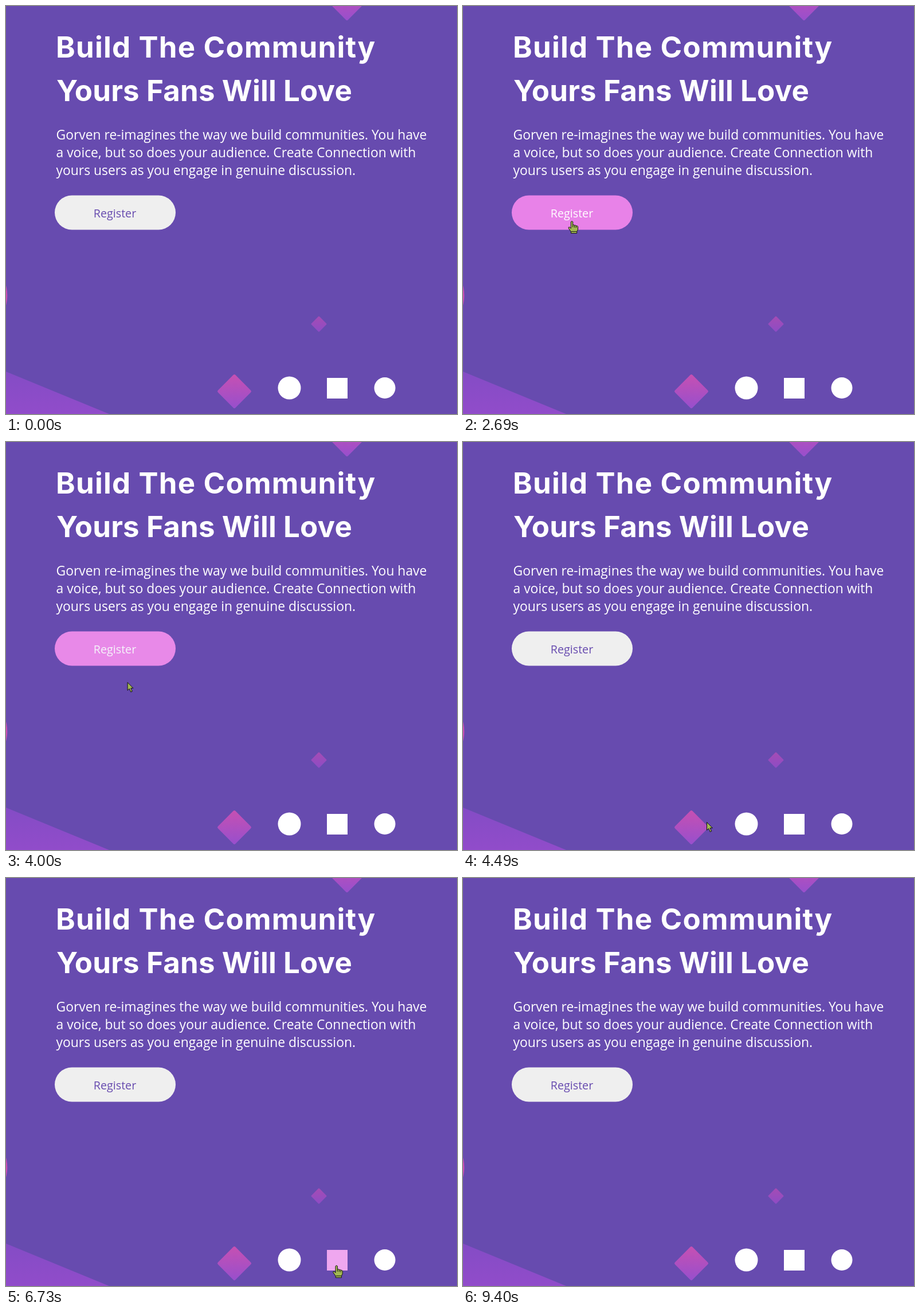
Write an HTML page that moves like this. It is 787 px wide and 712 px high and loops after 9.8 s.

```html
<!DOCTYPE html>
<html lang="en">
<head>
<meta charset="utf-8">
<title>Community landing page</title>
<style>
  html, body { margin: 0; width: 100%; height: 100%; overflow: hidden; background: #674baf; }
  svg { display: block; width: 787px; height: 712px; }
  .title { font: 700 51px Inter, sans-serif; fill: #fff; }
  .copy { font: 400 22.86px "Open Sans", sans-serif; fill: #fff; }
  .label { font: 400 19.7px "Open Sans", sans-serif; }
</style>
</head>
<body>
<svg viewBox="0 0 787 712">
  <defs>
    <linearGradient id="warm" x1="0" y1="0" x2="1" y2="1">
      <stop offset="0" stop-color="#c750b2"/>
      <stop offset="1" stop-color="#974fcd"/>
    </linearGradient>
    <linearGradient id="cool" x1="0" y1="0" x2="1" y2="1">
      <stop offset="0" stop-color="#a54cb4"/>
      <stop offset="1" stop-color="#8d4cc5"/>
    </linearGradient>
    <linearGradient id="hill" x1="0" y1="0" x2="0" y2="1">
      <stop offset="0" stop-color="#844cc5"/>
      <stop offset="1" stop-color="#914cca"/>
    </linearGradient>
    <rect id="tile" x="-21.5" y="-21.5" width="43" height="43" rx="2.5" transform="rotate(45)"/>
  </defs>
  <rect width="787" height="712" fill="#674baf"/>
  <use href="#tile" transform="translate(595 -4.5)" fill="url(#warm)"/>
  <use href="#tile" transform="translate(398.5 672.5)" fill="url(#warm)"/>
  <use href="#tile" transform="translate(546 555) scale(.46)" fill="url(#cool)"/>
  <circle cx="-63.7" cy="505" r="66" fill="#c94fb4"/>
  <path d="M0 638L180 712H0Z" fill="url(#hill)"/>

  <g class="title">
    <text x="87" y="90" letter-spacing="1.2">Build The Community</text>
    <text x="88" y="166" letter-spacing=".15">Yours Fans Will Love</text>
  </g>
  <g class="copy">
    <text x="87.5" y="233">Gorven re-imagines the way we build communities. You have</text>
    <text x="87.5" y="264">a voice, but so does your audience. Create Connection with</text>
    <text x="87.5" y="295">yours users as you engage in genuine discussion.</text>
  </g>

  <rect id="button" x="85" y="330.5" width="211" height="60" rx="30"/>
  <text id="label" class="label" x="190" y="369" text-anchor="middle">Register</text>

  <circle id="first" cx="494.5" cy="666.5" r="20"/>
  <rect id="second" x="560" y="649" width="36" height="36"/>
  <circle id="third" cx="661" cy="666.5" r="18.5"/>

  <g id="cursor" fill="#a3b853" stroke="#111" stroke-linejoin="round">
    <circle id="press" r="14" fill="#ff0" fill-opacity=".47" stroke="none"/>
    <path id="arrow" d="M.5.5V14.5L3.7 11.5 6.2 17.3 8.7 16.2 6.2 10.6H10.4Z"/>
    <g id="hand">
      <path d="M-1.7 1.5Q0-.8 1.7 1.5V7Q3.4 6 4.6 7.6 6.3 6.8 7.4 8.5 9.8 7.8 10.5 10V15L8.7 18.5V21.5H-1.5V19L-5.8 12.7Q-6.4 10.3-4.2 10.6L-1.7 13Z"/>
      <path d="M1.7 7V11M4.6 8V11.5M7.4 8.7V12M-1 18.5H8.5" fill="none"/>
    </g>
  </g>
</svg>
<script>
const LOOP = 9800, FADE = 400, CLICK = 150;
const ENTRY = [770, 700];
const WHITE = [255, 255, 255], PALE = [239, 239, 239], PINK = [232, 130, 232], VIOLET = [103, 75, 175];
const el = id => document.getElementById(id);

// pointer trips; "leave" trips speed up, the others slow down
const trips = [
  { from: 1120, to: 2070, x: 190, y: 375 },
  { from: 2690, to: 3170, x: 193, y: 405 },
  { from: 3170, to: 3500, x: 195, y: 375 },
  { from: 3700, to: 4470, x: 425, y: 663, leave: true },
  { from: 4900, to: 5500, x: 484, y: 667 },
  { from: 6250, to: 6800, x: 577, y: 676 },
  { from: 7540, to: 8000, x: 642, y: 667 },
  { from: 8360, to: 9330, x: 720, y: 711, leave: true }
];
const clicks = [5950, 7200, 8430];

// alternating enter and leave times
const hover = {
  button: [1890, 2980, 3290, 3980],
  first: [5000, 6300],
  second: [6560, 7610],
  third: [7880, 8950]
};

const ease = p => 1 - (1 - Math.min(p, 1) ** 1.3) ** 3;
const inside = (times, t) => times.filter(s => s <= t).length % 2 === 1;
const mix = (a, b, k) => `rgb(${a.map((v, i) => Math.round(v + (b[i] - v) * k))})`;
const show = (id, on) => el(id).setAttribute("visibility", on ? "visible" : "hidden");
const fill = (id, color) => el(id).setAttribute("fill", color);

function level(times, t) {
  let v = 0;
  times.forEach((start, i) => {
    const end = Math.min(t, times[i + 1] ?? LOOP);
    if (end > start) v += ((i + 1) % 2 - v) * ease((end - start) / FADE);
  });
  return v;
}

// x and y use different powers, which bends the route
function locate(t) {
  let [x, y] = ENTRY;
  for (const trip of trips) {
    if (t < trip.from) break;
    const k = Math.min((t - trip.from) / (trip.to - trip.from), 1);
    const run = power => trip.leave ? k ** power : 1 - (1 - k) ** power;
    x += (trip.x - x) * run(2.8);
    y += (trip.y - y) * run(2);
  }
  return [x, y];
}

function draw(t) {
  const lit = level(hover.button, t);
  fill("button", mix(PALE, PINK, lit));
  fill("label", mix(VIOLET, WHITE, lit));
  for (const id of ["first", "second", "third"]) fill(id, mix(WHITE, PINK, level(hover[id], t)));

  const present = t >= trips[0].from && t < trips.at(-1).to;
  const linked = Object.values(hover).some(times => inside(times, t));
  show("arrow", present && !linked);
  show("hand", present && linked);
  show("press", clicks.some(c => t >= c && t < c + CLICK));
  el("cursor").setAttribute("transform", `translate(${locate(t)})`);
}

const begin = performance.now();
function tick() {
  draw((performance.now() - begin) % LOOP);
  requestAnimationFrame(tick);
}
tick();
</script>
</body>
</html>
```
